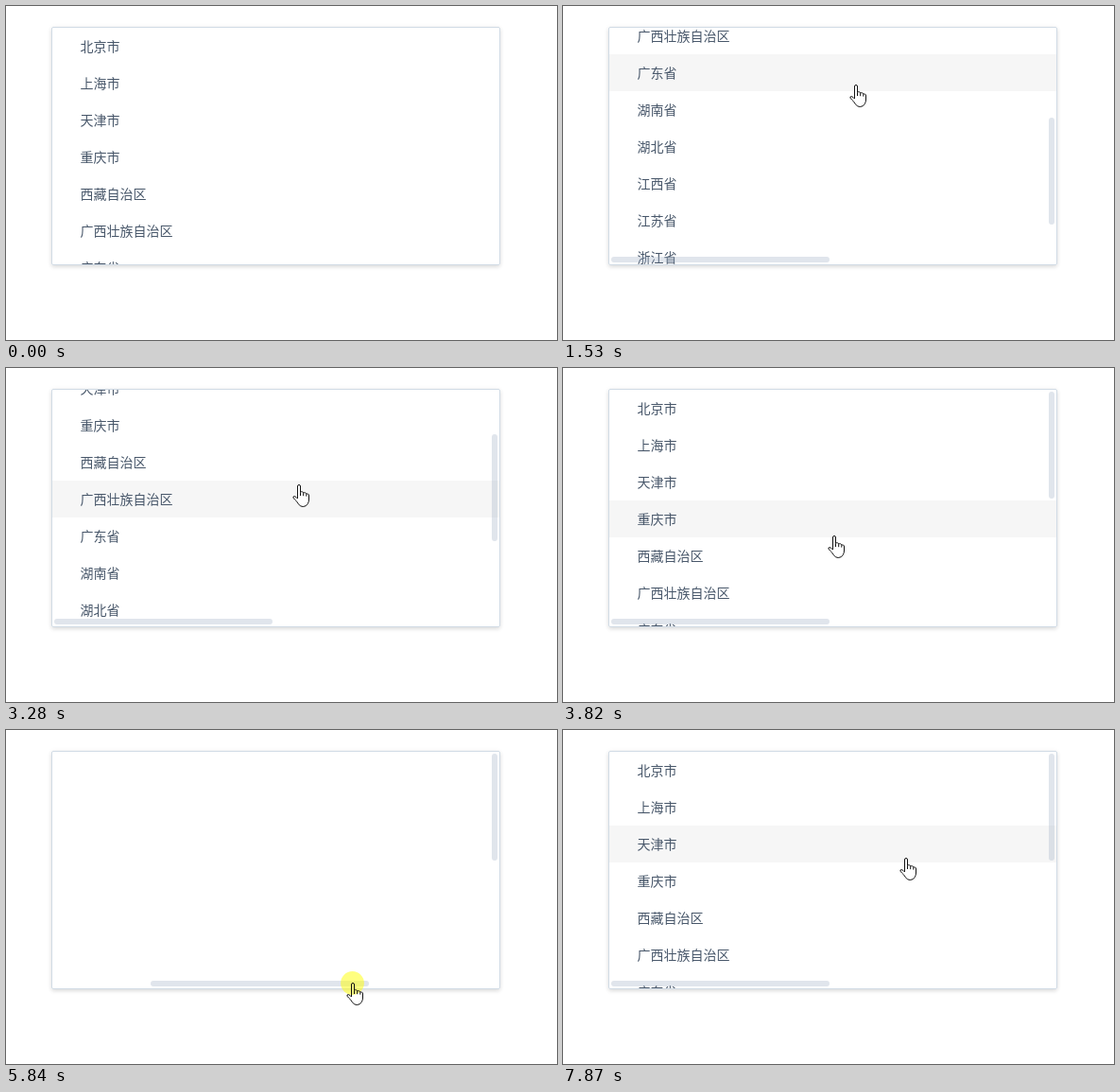
An HTML page for the animation above (8000 ms loop, 583 px wide and 353 px high).

```html
<!DOCTYPE html>
<html lang="zh-CN">
<head>
<meta charset="utf-8">
<title>Scrolling list</title>
<style>
  html, body { margin: 0; width: 100%; height: 100%; overflow: hidden; background: #fff; }
  .panel {
    position: absolute; left: 48px; top: 22px; width: 475px; height: 252px;
    box-sizing: border-box; border: 1px solid #d1dbe5; border-radius: 2px;
    box-shadow: 0 2px 4px rgba(0, 0, 0, .12), 0 0 6px rgba(0, 0, 0, .04);
  }
  svg { position: absolute; left: 0; top: 0; display: block; }
  text { font: 14px "Noto Sans CJK SC", "Noto Sans CJK", sans-serif; fill: #48576a; }
  .thumb { fill: #99a9bf; fill-opacity: .3; }
</style>
</head>
<body>
<div class="panel"></div>
<svg width="583" height="353" viewBox="0 0 583 353">
  <defs>
    <clipPath id="view"><rect x="49" y="23" width="473" height="250"/></clipPath>
    <path id="hand" d="M5.5 15V2Q5.5 .5 7 .5T8.5 2V8.5Q9 7.5 10.4 7.8T11.7 9.2Q12.5 8.4 13.6 8.8T14.8 10.2Q15.6 9.6 16.6 10.1T17.5 12V16Q17.5 18.5 16.3 20.4Q14.8 23.5 11.2 23.5Q8 23.5 6.5 20.8Q5 18 2.5 16Q.4 14 1 13Q2.3 12 4 13.5Z"/>
  </defs>
  <g clip-path="url(#view)">
    <rect id="band" x="49" width="473" height="39" fill="#f6f6f6"/>
    <g id="list"></g>
    <g id="bars">
      <rect id="barY" class="thumb" x="514" y="25" width="6" height="113" rx="3"/>
      <rect id="barX" class="thumb" x="51" y="265" width="231" height="6" rx="3"/>
    </g>
  </g>
  <g id="cursor">
    <use href="#hand" fill="#fff"/>
    <circle id="press" cx="6.5" cy=".5" r="12.4" fill="#ff0" fill-opacity=".5"/>
    <g fill="none" stroke="#111" stroke-linejoin="round">
      <use href="#hand"/>
      <path d="M8.5 8.5V12M11.7 9.2V12.2M14.8 10.2V12.6"/>
    </g>
  </g>
</svg>
<script>
const LOOP = 8000, ROW = 39, TOP = 23;
const VIEW = { w: 473, h: 250 }, THUMB = { w: 231, h: 113 };
const GRIP = 254, LAG = 13, MAX_DRAG = 235;
const names = ['北京市', '上海市', '天津市', '重庆市', '西藏自治区', '广西壮族自治区', '广东省',
  '湖南省', '湖北省', '江西省', '江苏省', '浙江省', '安徽省', '贵州省'];

const $ = id => document.getElementById(id);
const set = (id, name, value) => $(id).setAttribute(name, value);
const show = (id, on) => set(id, 'visibility', on ? 'visible' : 'hidden');
const clamp = (v, lo, hi) => Math.max(lo, Math.min(hi, v));
const move = (start, end, to, power = 1) => ({ start, end, to, power });

const pointerMoves = [
  move(110, 500, [303, 83]),
  move(1600, 2590, [303, 123]),
  move(3810, 3820, [280, 177]),
  move(3820, 4290, [252, 263]),
  move(4920, 5070, [253, 267]),
  move(5220, 5980, [414, 267], 2),
  move(6070, 6700, [488, 268]),
  move(6850, 7000, [414, 271]),
  move(7000, 7470, [212, 268]),
  move(7640, 7870, [356, 135])
];
const wheelMoves = [
  move(420, 890, [100]),
  move(980, 1530, [206]),
  move(1530, 1760, [294]),
  move(2670, 2900, [100]),
  move(3280, 3440, [0])
];

// Runs through the moves, each starting where the one before it ended.
function follow(from, moves, t) {
  return moves.reduce((pos, { start, end, to, power }) => {
    const p = clamp((t - start) / (end - start), 0, 1) ** power;
    return pos.map((v, i) => v + (to[i] - v) * p);
  }, from);
}
const pointer = t => follow([303, 20], pointerMoves, t);

names.forEach((name, i) => {
  const text = document.createElementNS('http://www.w3.org/2000/svg', 'text');
  text.setAttribute('x', 78.5);
  text.setAttribute('y', 48 + ROW * i);
  text.textContent = name;
  $('list').append(text);
});

function draw(t) {
  const [x, y] = pointer(t).map(Math.round);
  const scroll = Math.round(follow([0], wheelMoves, t)[0]);
  const pressed = t > 5000 && t < 7600;
  const drag = pressed ? Math.round(clamp(pointer(t - LAG)[0] - GRIP, 0, MAX_DRAG)) : 0;
  const row = Math.floor((y - TOP + scroll) / ROW);
  const onBar = y > 263 && y < 271;
  const active = t >= 110;

  set('list', 'transform', `translate(${-Math.round(drag * VIEW.w / THUMB.w)} ${-scroll})`);
  set('band', 'y', TOP + row * ROW - scroll);
  show('band', active && y >= TOP && !onBar);
  set('barY', 'y', 25 + Math.round(scroll * THUMB.h / VIEW.h));
  set('barX', 'x', 51 + drag);
  set('bars', 'opacity', clamp((t - 150) / 340, 0, 1));
  set('cursor', 'transform', `translate(${x} ${y})`);
  show('cursor', active);
  show('press', pressed);
}

const begin = performance.now();
function tick() {
  draw((performance.now() - begin) % LOOP);
  requestAnimationFrame(tick);
}
tick();
</script>
</body>
</html>
```
